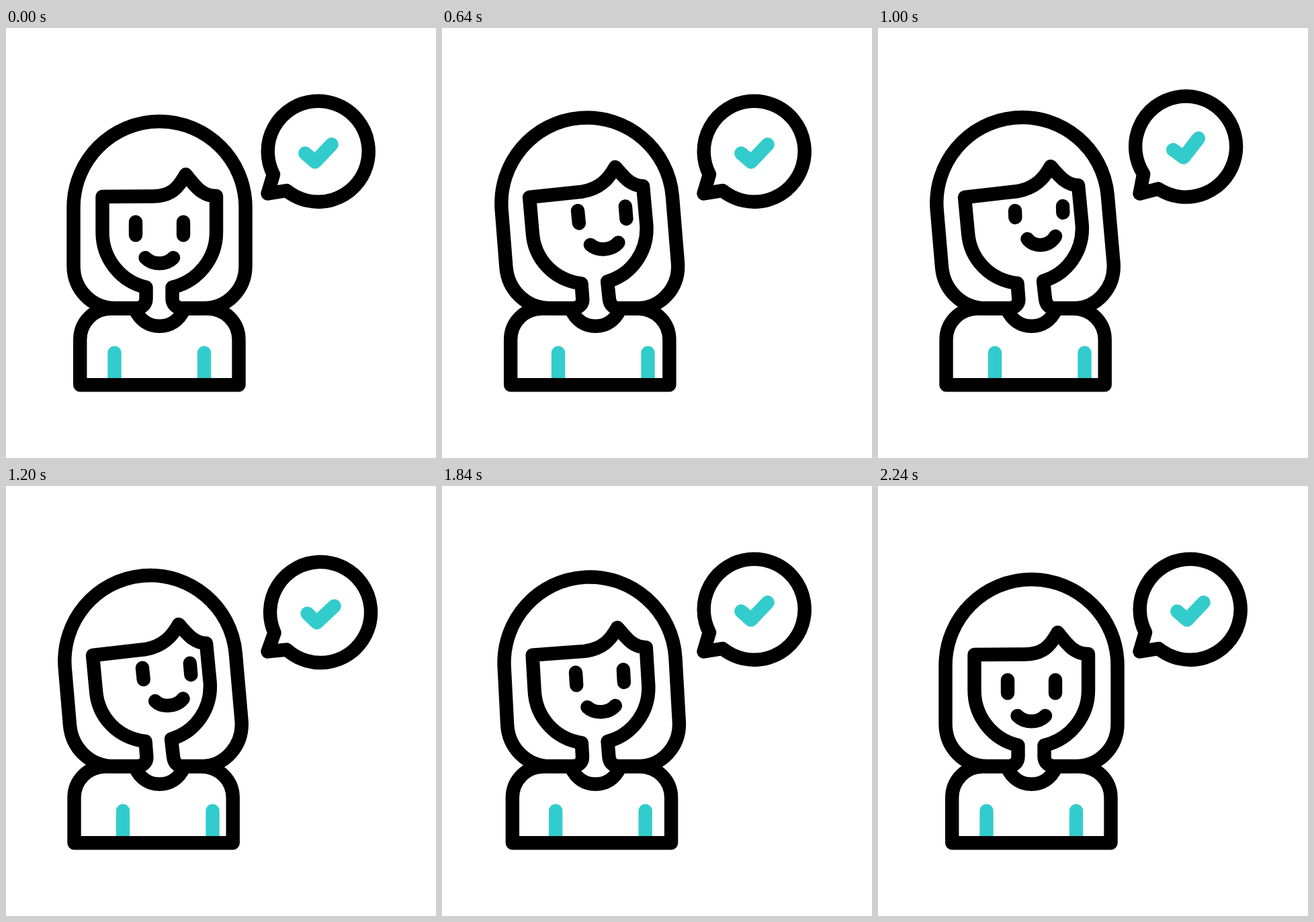
An HTML page that plays this animation: 640x640 px, repeating every 2640 ms.

```html
<!DOCTYPE html>
<html lang="en">
<head>
<meta charset="utf-8">
<title>Woman with speech bubble</title>
<style>
  html, body { margin: 0; height: 100%; overflow: hidden; background: #fff; }
  svg { display: block; width: 100vw; height: 100vh; }
  path { fill: none; stroke: #000; stroke-width: 20.4; stroke-linecap: round; stroke-linejoin: round; }
  .accent { stroke: #3cc; }
</style>
</head>
<body>
<svg viewBox="0 0 640 640">
  <path id="arms" class="accent"/>
  <path id="hair"/>
  <path id="shirt"/>
  <path d="M192 419C200 436 213 443.7 228.5 443.7S257 436 265 419"/>
  <path id="face"/>
  <g id="bubble">
    <path d="M398 218A75 75 0 1 1 417.5 242L389.5 246.5Z"/>
    <path class="accent" d="M445.3 186.5L460 199.3L484.7 173.3"/>
  </g>
</svg>
<script>
const LOOP = 2640, STEP = 40;

// Each part has an upright and a tilted pose with matching commands.
const poses = {
  hair: [
    `M100.5 267C100.5 196.3 157.8 139 228.5 139S356.5 196.3 356.5 267
     L356.5 354C356.5 388.5 330 417 295 417L262 417C253.5 417 247.5 411 247.5 403
     L247.5 386C285.6 377.2 313 343.2 313 304L313 250
     C290 250 281 234 267.5 218C255 240 245 250 219 250.5L143.5 251
     L143.5 304C143.5 343.2 170.4 377.2 208.5 386
     L208.5 403C208.5 411 202.5 417 194 417L162 417C127 417 100.5 388.5 100.5 354Z`,
    `M87.8 271.6C81.7 201.5 133.6 139.6 203.7 133.5S335.7 179.3 341.8 249.4
     L350.6 350C353 386 326 417 292 417L263 417C254 417 250 411 249 403
     L246 376.5C282 366 306 332 303.7 293L298 234
     C279 234 269 219 257 206C247 224 234 238 208 243L129 252
     L134 305C137 344 166 375 207.5 380
     L209.3 403C210 411 204 417 195 417L160 417C125 417 98 390 95 356Z`
  ],
  shirt: [
    "M190 417.5L156 417.5C130.5 417.5 110.2 438 110.2 464L110.2 531.2L346.5 531.2L346.5 464C346.5 438 326 417.5 300 417.5L267 417.5",
    "M190 417.5L148 417.5C122 417.5 101.5 438 101.5 464L101.5 531.2L337.7 531.2L337.7 464C337.7 438 317 417.5 291 417.5L267 417.5"
  ],
  arms: ["M161.5 483.5L161.5 525M295 483.5L295 525", "M174 483.5L174 525M307.5 483.5L307.5 525"],
  face: [
    "M193 288.7L193 308.3M264 288.7L264 308.3M207.5 342C218 353 238.5 353 249 342",
    "M202.8 270.5L204.8 289M273.6 263.5L275.3 282M222 321C233 331 254 329 263.5 317.5"
  ]
};
const grin = "M204 272L204.3 282M275 265L275.3 275M222.5 314C232 327 255 326 264 310";

// Keyframes are [time, value] pairs.
const tiltKeys = [[200, 0], [730, 1], [1560, 1], [2220, 0]];
const grinKeys = [[780, 0], [1000, 1], [1260, 0], [1430, 1], [1650, 0]];
const swingKeys = [[790, 0], [940, -13.2], [1115, 14.3], [1275, -6], [1400, 5], [1540, -4.5], [1680, 2], [1840, 0]];

const $ = id => document.getElementById(id);

function valueAt(keys, t) {
  const i = keys.findIndex(k => k[0] > t);
  if (i === 0) return keys[0][1];
  if (i < 0) return keys[keys.length - 1][1];
  const [t0, a] = keys[i - 1], [t1, b] = keys[i];
  const p = (t - t0) / (t1 - t0);
  return a + (b - a) * p * p * (3 - 2 * p);
}

function mix(from, to, p) {
  const ends = to.match(/[\d.]+/g);
  let i = 0;
  return from.replace(/[\d.]+/g, n => (+n + (ends[i++] - n) * p).toFixed(2));
}

function draw(now) {
  const t = Math.floor(now % LOOP / STEP) * STEP;
  const tilt = valueAt(tiltKeys, t);
  for (const id in poses) {
    let d = mix(...poses[id], tilt);
    if (id === "face") d = mix(d, grin, valueAt(grinKeys, t));
    $(id).setAttribute("d", d);
  }
  $("bubble").setAttribute("transform", `rotate(${valueAt(swingKeys, t)} 390 246)`);
}

const start = performance.now();
function tick() {
  draw(performance.now() - start);
  requestAnimationFrame(tick);
}
tick();
</script>
</body>
</html>
```
